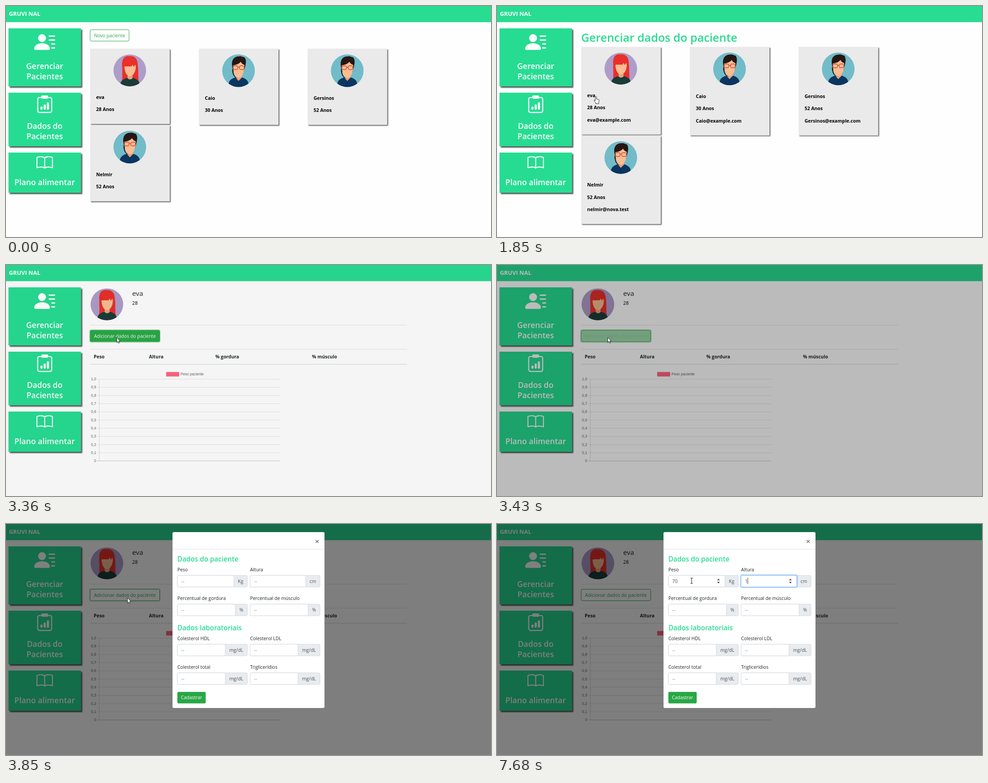
Animation, 1084 px wide and 517 px high, one loop 8 s. Source, as an HTML page:

```html
<!DOCTYPE html>
<html lang="pt-BR">
<head>
<meta charset="utf-8">
<title>Pacientes</title>
<style>
html, body { margin: 0; width: 100%; height: 100%; overflow: hidden; background: #fefefe; }
svg { display: block; width: 100vw; height: 100vh; font-family: "Open Sans", "Noto Sans", sans-serif; }
.chart text { font-family: "Liberation Sans", Arial, sans-serif; }
</style>
</head>
<body>
<svg id="stage" viewBox="0 0 1084 517"></svg>
<script>
const GREEN = '#28dc92', BTN = '#28a745', INK = '#212529', GREY = '#6c757d', LINE = '#dee2e6';
const LOOP = 8000, BODY = 10.43;

// ---- SVG helpers ----
const text = (x, y, s, size = BODY, fill = INK, weight = 400, anchor = 'start', id = '') =>
  `<text id="${id}" x="${x}" y="${y}" font-size="${size}" fill="${fill}" font-weight="${weight}" text-anchor="${anchor}">${s}</text>`;
const rect = (x, y, w, h, fill, more = '') =>
  `<rect x="${x}" y="${y}" width="${w}" height="${h}" fill="${fill}" ${more}/>`;
const path = (d, fill, more = '') => `<path d="${d}" fill="${fill}" ${more}/>`;
const group = (id, content, more = '') => `<g id="${id}" ${more}>${content}</g>`;
const line = (d, color, w = 1) => path(d, 'none', `stroke="${color}" stroke-width="${w}"`);
const outline = (x, y, w, h, more = '') =>
  rect(x, y, w, h, 'none', `rx="2.8" stroke="${BTN}" stroke-width="1" ${more}`);

// ---- Avatars, centred on 0,0 ----
const woman = `<g clip-path="url(#oval)">
  ${rect(-37, -37, 74, 74, '#ae9dc9')}
  ${path('M-2-32C-16-33-18-20-17-8C-17 10-15 22-21 38H23C17 24 20 8 18-12C17-27 11-33-2-32Z', '#e9302a')}
  ${path('M-22 38C-22 24-17 21-8 17H9C18 21 23 24 23 38Z', '#1a3c39')}
  ${path('M-5 8H6V17C4 21-3 21-5 17Z', '#e8a47c')}
  ${path('M-12-14H13C15 1 8 13 0 13C-7 13-13 2-12-14Z', '#f9bd91')}
  ${path('M-14-6C-16-22-9-29 1-29C12-29 17-19 15-4L12-13L9-8L6-13L4-9H-11Z', '#e9302a')}</g>`;
const man = `<g clip-path="url(#disc)">
  ${rect(-37, -37, 74, 74, '#72bbc8')}
  ${path('M-23 38C-23 22-18 19-7 15H8C18 19 23 22 23 38Z', '#0a3661')}
  ${path('M-7 15L0 23L8 15V8H-6Z', '#e8a47c')}
  ${path('M-14-9C-17-24-10-32 1-32C5-34 10-30 13-30C18-25 17-17 14-6L12 3H-12Z', '#251714')}
  ${path('M-12-12C-4-13 2-16 5-20C7-16 10-14 13-13C15 1 8 16 0 16C-7 16-13 4-12-12Z', '#f9bd91')}
  ${path('M-12-2C-12 8-8 15-2 17C-9 17-15 8-14-4Z', '#251714')}
  <g fill="none" stroke="#c9473c" stroke-width="1.4">
    <rect x="-12" y="-11" width="10.5" height="8.5" rx="3.5"/><rect x="2" y="-11" width="10.5" height="8.5" rx="3.5"/>
    <path d="M-1.5-8H2"/></g>
  ${line('M0 24V37', '#082b4f', .8)}</g>`;
const avatar = (x, y, art) => `<g transform="translate(${x} ${y})">${art}</g>`;

// ---- Shared frame: header and side menu ----
const menuBox = (y, h, labels, first) =>
  rect(5.5, y, 162, h, GREEN, 'filter="url(#deep)"') +
  labels.map((s, i) => text(86.5, first + i * 23.3, s, 17.6, '#fff', 600, 'middle')).join('');
const icons =
  `<g transform="translate(63 57.2) scale(2.93)"><circle cx="6" cy="5" r="3"/>
    <path d="M1 14Q0 14 0 13C0 12 1 9 6 9S12 12 12 13Q12 14 11 14Z"/>
    <path d="M11.5 3.5h4M11.5 6.5h4M13.5 9.5h2M13.5 12.5h2" stroke="#fff" stroke-linecap="round"/></g>
  <g transform="translate(67.3 201) scale(2.4)">
    <rect x="1.5" y="1.6" width="13" height="13.9" rx="1.5" fill="none" stroke="#fff"/>
    <rect x="4.8" y="-.3" width="6.4" height="3" rx="1"/>
    <path d="M5 11v1M8 9v3M11 7v5" stroke="#fff" stroke-width="2" stroke-linecap="round"/></g>
  <path transform="translate(68 332.3) scale(2.31)" fill="none" stroke="#fff" stroke-width=".95" stroke-linejoin="round"
    d="M8 3.3C6.5 1.9 3 1.8 .5 2.9V12.9C3 11.9 6.5 11.7 8 13.2C9.5 11.7 13 11.9 15.5 12.9V2.9C13 1.8 9.5 1.9 8 3.3ZV13.2"/>`;
const shell = rect(0, 0, 1084, 517, '#fefefe') + rect(0, 0, 1084, 36.2, GREEN) +
  text(6.5, 22.3, 'GRUVI NAL', 12.9, '#fff', 700) +
  menuBox(50, 130, ['Gerenciar', 'Pacientes'], 140.5) +
  menuBox(194, 120, ['Dados do', 'Pacientes'], 274.8) +
  menuBox(328, 90, ['Plano alimentar'], 401.3) + `<g fill="#fff">${icons}</g>`;

// ---- Patient cards ----
const people = [
  ['eva', 28, 'eva@example.com'], ['Caio', 30, 'Caio@example.com'],
  ['Gersinos', 52, 'Gersinos@example.com'], ['Nelmir', 52, 'nelmir@nova.test']];
const cards = (top, rowHeight, withMail) => people.map(([name, age, mail], i) => {
  const x = 188 + i % 3 * 243, y = top + (i > 2 ? rowHeight : 0), cut = i ? 0 : 2;
  const rows = [name, age + ' Anos'].concat(withMail ? mail : []);
  return rect(x, y, 178, rowHeight - cut - .5, '#eaeaea', 'filter="url(#soft)"') +
    avatar(x + 88.7, y + 49.3 - cut / 3, i ? man : woman) +
    rows.map((s, k) => text(x + 13.5, y + 114.5 - cut + k * 27.4, s, 10.5, '#000', 700)).join('');
}).join('');
const listPage = outline(188, 53, 87, 25.5) + text(231.5, 69.7, 'Novo paciente', BODY, BTN, 400, 'middle') +
  cards(95.5, 171, false);
const dataPage = text(188, 79.8, 'Gerenciar dados do paciente', 25.3, GREEN, 600) + cards(91.5, 198.4, true);

// ---- Patient detail ----
const scale = Array.from({ length: 11 }, (_, i) => {
  const y = 255.5 + i * 18.3, label = i < 10 ? ((10 - i) / 10).toFixed(1).replace('.', ',') : '0';
  return line(`M203.5 ${y}H613`, i < 10 ? '#e4e4e4' : '#c4c4c4') + text(201.5, y + 2.6, label, 8.2, '#666', 400, 'end');
}).join('');
const detailPage = avatar(225.5, 88, woman) + text(282, 69, 'eva', 15.3, INK, 500) + text(282, 89, '28', 10.9, '#000', 500) +
  line('M188 134.5H896M188 188.5H896', '#e2e2e2') + line('M188 222.3H896', LINE, 1.4) +
  outline(186.9, 144.9, 157.7, 28.2, 'id="ring" stroke-width="2.4"') +
  rect(188, 146, 155.5, 25.7, BTN, 'id="fill" rx="2.8"') + outline(188, 146, 155.5, 25.7) +
  text(265.8, 163, 'Adicionar dados do paciente', BODY, BTN, 400, 'middle', 'add') +
  [[196, 'Peso'], [319.5, 'Altura'], [468, '% gordura'], [684, '% músculo']]
    .map(([x, s]) => text(x, 209.3, s, 10.4, INK, 700)).join('') +
  group('', rect(358, 239.5, 29, 10, '#ff6384') + text(390, 247.2, 'Peso paciente', 8.2, '#666') +
    scale + line('M208.5 255V438.5', '#d8d8d8'), 'class="chart"');

// ---- Modal form ----
const field = (x, y, label, unit, unitWidth, id = '') => {
  const w = 156.3, split = x + w - unitWidth;
  return text(x, y - 9.5, label) +
    rect(x, y, w, 26, '#e9ecef', 'rx="2.8" stroke="#ced4da" stroke-width=".9"') +
    rect(x, y, w - unitWidth, 26, '#fff', 'rx="2.8" stroke="#ced4da" stroke-width=".9"') +
    text(split + unitWidth / 2, y + 17, unit, BODY, '#495057', 400, 'middle') +
    text(x + 8.8, y + 17, '--', BODY, GREY, 400, 'start', id);
};
const steppers = (id, x) => group(id,
  path(`M${x - 3} 126L${x} 122.5L${x + 3} 126ZM${x - 3} 129.5L${x} 133L${x + 3} 129.5Z`, '#444'));
const focusBox = (id, x, w) => group(id,
  rect(x - 1.3, 113.7, w + 2.6, 28.6, 'none', 'rx="3.5" stroke="#007bff" stroke-opacity=".25" stroke-width="2.2"') +
  rect(x, 115, w, 26, 'none', 'rx="2.8" stroke="#80bdff"'));
const L = 383, R = 545.5;
const modal = rect(372, 18, 340, 394, '#fff', 'rx="3" stroke="#000" stroke-opacity=".2" stroke-width=".7"') +
  line('M372 56.5H712', LINE) + line('M692.3 35.8L698.7 42.2M698.7 35.8L692.3 42.2', '#7f7f7f', 1.8) +
  text(L, 84, 'Dados do paciente', 15.25, GREEN, 600) + text(L, 238, 'Dados laboratoriais', 15.25, GREEN, 600) +
  field(L, 115, 'Peso', 'Kg', 29.8, 'weight') + field(R, 115, 'Altura', 'cm', 31.8, 'height') +
  field(L, 179.3, 'Percentual de gordura', '%', 26.5) + field(R, 179.3, 'Percentual de músculo', '%', 26.5) +
  field(L, 269, 'Colesterol HDL', 'mg/dL', 49.2) + field(R, 269, 'Colesterol LDL', 'mg/dL', 49.2) +
  field(L, 333, 'Colesterol total', 'mg/dL', 49.2) + field(R, 333, 'Triglicerídios', 'mg/dL', 49.2) +
  rect(L, 375.7, 63.3, 25.8, BTN, 'rx="2.8"') + text(414.6, 392.4, 'Cadastrar', BODY, '#fff', 400, 'middle') +
  focusBox('focusWeight', L, 126.5) + focusBox('focusHeight', R, 124.5) +
  steppers('stepWeight', 495) + steppers('stepHeight', 655.7) +
  rect(0, 120.5, .9, 14, '#222', 'id="caret"');

// ---- Pointer shapes, hot spot on 0,0 ----
const edge = 'stroke="#000" stroke-width=".8" stroke-linejoin="round"';
const pointer =
  path('M0 0V11.5L2.7 9L4.4 13L6.2 12.2L4.5 8.4H8Z', '#fff', `id="arrow" ${edge}`) +
  path('M-1.3 1.3Q0-.6 1.3 1.3V6.2L5.4 7Q7.6 7.5 7.4 9.7L6.3 13.5V16.6H-.4V14.4L-4 9.9Q-4 7.8-2.7 8.6L-1.3 10Z', '#fff', `id="hand" ${edge}`) +
  group('beam', line('M-2.5-6H-.7L0-5.3L.7-6H2.5M0-5.3V5.3M-2.5 6H-.7L0 5.3L.7 6H2.5', '#222', 1.1));

const shadow = (id, d, blur, alpha) => `<filter id="${id}" x="-10%" y="-10%" width="125%" height="125%">
  <feDropShadow dx="${d}" dy="${d}" stdDeviation="${blur}" flood-color="#000" flood-opacity="${alpha}"/></filter>`;
document.getElementById('stage').innerHTML =
  `<defs>${shadow('deep', 3, 1.3, .65)}${shadow('soft', 2, .8, .6)}
    <clipPath id="disc"><circle r="36.5"/></clipPath>
    <clipPath id="oval"><ellipse rx="36.5" ry="35.6"/></clipPath></defs>` +
  shell + group('list', listPage) + group('data', dataPage) + group('detail', detailPage) +
  rect(0, 0, 1084, 517, '#000', 'id="backdrop"') + group('modal', modal) + group('pointer', pointer);

// ---- Motion ----
const el = id => document.getElementById(id);
const set = (id, name, value) => el(id).setAttribute(name, value);
const show = (id, on) => set(id, 'display', on ? 'inline' : 'none');
const ramp = (t, start, length) => Math.min(1, Math.max(0, (t - start) / length));
const smooth = p => p * p * (3 - 2 * p);
const last = (list, t) => list.filter(v => v <= t).pop();

const route = [
  [180, 925, 300], [390, 640, 285], [670, 89, 230], [740, 94, 234], [1120, 94, 234], [1500, 160, 220],
  [1850, 221, 202], [1920, 235, 193], [2130, 247, 186], [2980, 247, 186], [3220, 247.5, 162],
  [3430, 247.5, 162], [3570, 250, 169.5], [3800, 252, 170], [4270, 435, 127]];
function locate(t) {
  const i = route.findIndex(k => k[0] > t);
  if (i < 0) return route[route.length - 1].slice(1);
  const [t0, x0, y0] = route[Math.max(0, i - 1)], [t1, x1, y1] = route[i];
  const p = ramp(t, t0, t1 - t0 || 1);
  return [x0 + (x1 - x0) * p, y0 + (y1 - y0) * p];
}
function pointerKind(t, x, y) {
  if (t < 2460) return x < 168 || (x > 188 && y > 91 && y < 290 && (x - 188) % 243 < 178) ? 'hand' : 'arrow';
  if (t < 3350) return y < 172 ? 'hand' : 'arrow';
  return t > 3800 && x > L && x < 509.5 && y > 115 && y < 141 ? 'beam' : 'arrow';
}

function draw(t) {
  const base = last([0, 180, 1150, 2460, 3010, 6200], t);
  const q = base + Math.floor((t - base) / 70) * 70;

  show('list', q < 950);
  show('data', q >= 950 && q < 2460);
  show('detail', q >= 2460);

  const hover = smooth(ramp(q, 3120, 150)) * (1 - smooth(ramp(q, 3350, 150)));
  const mix = (a, b) => Math.round(a + (b - a) * hover);
  set('fill', 'fill-opacity', hover);
  set('add', 'fill', `rgb(${mix(40, 255)},${mix(167, 255)},${mix(69, 255)})`);
  set('ring', 'stroke-opacity', .5 * ramp(q, 3250, 100) * (1 - ramp(q, 3805, 150)));

  set('backdrop', 'opacity', .5 * ramp(q, 3350, 150));
  show('modal', q > 3505);
  set('modal', 'opacity', ramp(q, 3505, 150));
  set('modal', 'transform', `translate(0 ${-34.2 * (1 - ramp(q, 3505, 300)) ** 1.7})`);

  const inHeight = t >= 6200;
  const weight = t < 5670 ? '' : t < 5740 ? '7' : '70', height = t < 7680 ? '' : '1';
  for (const [id, value] of [['weight', weight], ['height', height]]) {
    el(id).textContent = value || '--';
    set(id, 'fill', value ? '#495057' : GREY);
  }
  set('focusWeight', 'opacity', ramp(q, 4320, 150) * (1 - ramp(q, 6180, 150)));
  set('focusHeight', 'opacity', ramp(q, 6180, 150));
  show('stepWeight', q >= 4270);
  show('stepHeight', inHeight);

  const typed = last([4350, 5740, 6220, 7680], t);
  show('caret', t >= 4350 && Math.floor((t - typed) / 530) % 2 === 0);
  set('caret', 'x', inHeight ? 554.2 + height.length * 5.96 : 391.4 + weight.length * 5.96);

  const [x, y] = locate(q), kind = pointerKind(q, x, y);
  show('pointer', q >= 180);
  set('pointer', 'transform', `translate(${x} ${y})`);
  for (const id of ['arrow', 'hand', 'beam']) show(id, id === kind);
}

const start = performance.now();
function tick() {
  draw((performance.now() - start) % LOOP);
  requestAnimationFrame(tick);
}
tick();
</script>
</body>
</html>
```
